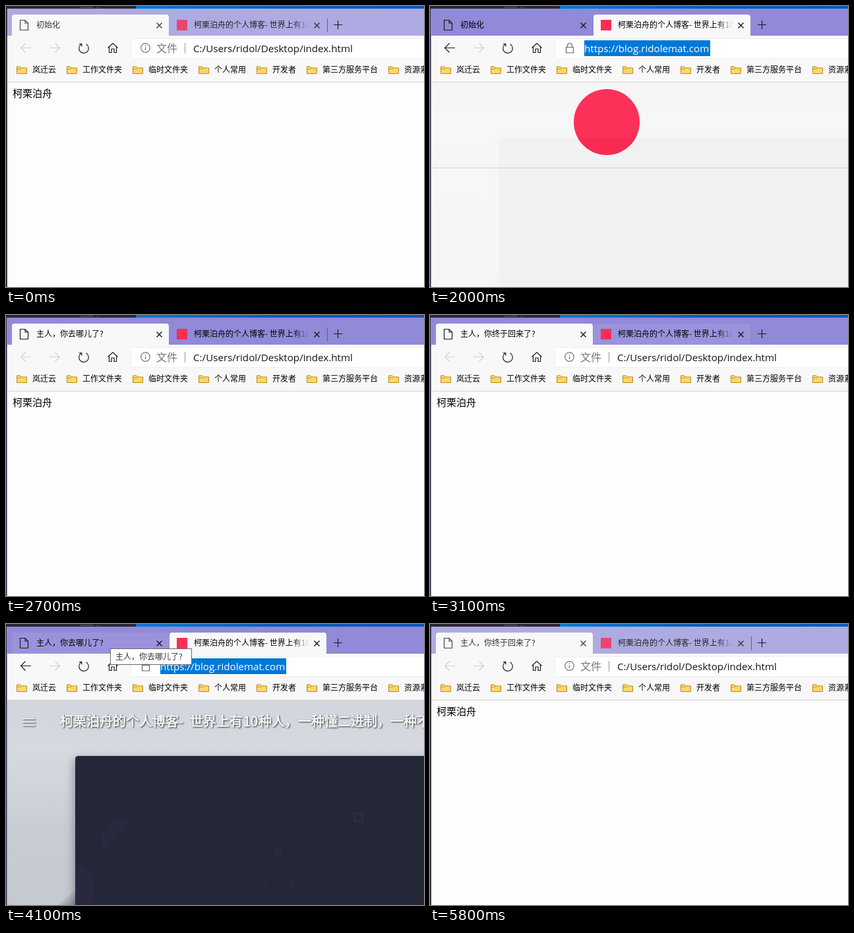
Write an HTML page that moves like this. It is 634x426 px and loops after 5.9 s.

```html
<!DOCTYPE html>
<html lang="zh-CN">
<head>
<meta charset="utf-8">
<title>标签页标题</title>
<style>
html, body { margin: 0; width: 100%; height: 100%; overflow: hidden; background: #fdfdfd; }
svg { display: block; width: 634px; height: 426px; font: 12px "Noto Sans CJK SC", "Noto Sans", sans-serif; }
.line { fill: none; stroke: #1c1c1c; stroke-width: 1.2; }
.off { stroke: #cfcfcf; }
.address { font: 15.15px "Open Sans", "Noto Sans", sans-serif; }
.headline { font-size: 20px; fill: #fff; stroke: #fff; stroke-width: .5; }
.raised { filter: drop-shadow(1px 1px 1px rgba(0, 0, 0, .8)); }
.decor { fill: none; stroke: #2d2b42; }
.decor .solid { fill: #29283f; stroke: none; }
</style>
</head>
<body>
<svg viewBox="0 0 634 426">
  <defs>
    <linearGradient id="desk"><stop stop-color="#0878d8"/><stop offset=".5" stop-color="#0a5cb8"/><stop offset="1" stop-color="#0a58c0"/></linearGradient>
    <linearGradient id="fade" gradientUnits="userSpaceOnUse" x1="434" x2="460"><stop/><stop offset="1" stop-opacity="0"/></linearGradient>
    <linearGradient id="sky" x2="0" y2="1"><stop stop-color="#d2d5dd"/><stop offset=".25" stop-color="#d6d9e0"/><stop offset=".65" stop-color="#c8cdd4"/><stop offset="1" stop-color="#c4c9d0"/></linearGradient>
    <linearGradient id="rock" x1="0" y1="0" x2="1" y2="1"><stop offset=".35" stop-color="#9a9da4" stop-opacity="0"/><stop offset="1" stop-color="#858890"/></linearGradient>
    <filter id="soft" x="-10%" y="-10%" width="120%" height="130%"><feGaussianBlur stdDeviation="7"/></filter>
    <clipPath id="panelClip"><path d="M634 200H110q-5 0-5 5v221h529z"/></clipPath>
    <g id="folder">
      <path d="M.5 11.500V.9h5.200l1.600 2h8.200v8.600z" fill="#ffd766" stroke="#b88a1c"/>
      <path d="M1 4.500h5.500l1.200-1.400" fill="none" stroke="#c89a2c"/>
    </g>
    <path id="cross" class="line" d="M-4-4 4 4M4-4-4 4" style="stroke-width:1.500"/>
  </defs>

  <rect width="634" height="426" fill="#2a2631"/>
  <path fill="url(#desk)" d="M197 0h437v5H197z"/>
  <path fill="#48444e" d="M112 1h20v2h-20zM136 2h8v1h-8z"/>
  <rect id="edge" x="1" y="4" width="1" height="422"/>
  <rect id="bar" x="2" y="4" width="632" height="41"/>

  <path id="tab1" d="M9 45V17q0-4 4-4h230q4 0 4 4v28z"/>
  <path id="tab2" d="M248 45V17q0-4 4-4h230q4 0 4 4v28z"/>
  <g id="labels">
    <path class="line" d="M21.500 21.500h7.500l4.500 4.500v10.500h-12zM29 21.500v4.500h4.500"/>
    <text id="name" x="46" y="33"></text>
    <use href="#cross" x="232.500" y="29.500"/>
    <rect x="259" y="21" width="16" height="16" fill="#fb2d55"/>
    <text x="285" y="33" fill="url(#fade)">柯栗泊舟的个人博客- 世界上有10</text>
    <use href="#cross" x="471.500" y="29.500"/>
  </g>
  <path id="divider" d="M487.500 19v21" stroke="#615d91"/>
  <path class="line" d="M497 28.500h13M503.500 22v13"/>

  <rect x="2" y="45" width="632" height="71" fill="#f8f8f8"/>
  <rect id="hover" x="98" y="49" width="40" height="30" rx="2" fill="#e4e4e4"/>
  <path id="back" class="line" d="M38 63.500H22.500M29.500 56.500l-7 7 7 7"/>
  <path class="line off" d="M66 63.500h15.500M74.500 56.500l7 7-7 7"/>
  <path class="line" d="M121.500 57.700a7.300 7.300 0 1 1-7.500.300M110.800 57.500h4v4"/>
  <path class="line" d="M154.500 63.500l7.500-7 7.500 7M156.500 62v8.500h3.500v-5.500h4v5.500h3.500V62"/>
  <rect x="189.500" y="49.500" width="450" height="30" rx="2" fill="#fff" stroke="#efefef"/>
  <g id="fileAddress">
    <circle cx="211.500" cy="63.500" r="6.800" class="line" style="stroke:#767676"/>
    <path d="M211.500 62.500v4.500M211.500 59.500v1.500" stroke="#767676" stroke-width="1.300"/>
    <text x="228" y="70" font-size="16" fill="#767676">文件</text>
    <path d="M271.500 56v16" stroke="#9a9a9a"/>
    <text class="address" x="284" y="70" fill="#161616">C:/Users/ridol/Desktop/index.html</text>
  </g>
  <g id="webAddress">
    <path class="line" style="stroke:#666" d="M206.500 62.500h11v8.500h-11zM208.500 62.500v-2.500a3.500 3.500 0 0 1 7 0v2.500"/>
    <rect x="234" y="52" width="191" height="24" fill="#0078d7"/>
    <text class="address" x="234" y="70" fill="#fff">https://blog.ridolemat.com</text>
  </g>
  <g id="bookmarks"></g>
  <path d="M2 115.500h632" stroke="#d4d4d4"/>

  <g id="filePage">
    <rect x="2" y="116" width="632" height="310" fill="#fdfdfd"/>
    <text x="10" y="138" font-size="15">柯栗泊舟</text>
  </g>

  <g id="blog">
    <rect x="2" y="116" width="632" height="310" fill="url(#sky)"/>
    <path d="M78 426l27-22v22z" fill="url(#rock)"/>
    <rect x="103" y="205" width="560" height="250" fill="#454954" opacity=".5" filter="url(#soft)"/>
    <g clip-path="url(#panelClip)">
      <rect x="105" y="200" width="529" height="226" fill="#232738"/>
      <g class="decor">
        <circle class="solid" cx="93" cy="401" r="41"/>
        <path class="solid" d="M150 344A29 29 0 0 1 190 303z"/>
        <path id="waves"/>
        <path d="M528.500 287.500h12v11h-12z" stroke-width="3"/>
        <rect class="solid" x="406" y="340" width="13" height="13" rx="3"/>
        <circle class="solid" cx="393" cy="393" r="4.500"/>
        <circle class="solid" cx="433" cy="393" r="4"/>
        <path d="M168 342l47-63 75 121M258 400l22-80 50 82" stroke="#27283b"/>
        <path d="M151 413h38M151 424h38" stroke-width="2" stroke-dasharray="2 15"/>
      </g>
    </g>
    <g class="raised">
      <path d="M25 143.500h19M25 148.500h19M25 153.500h19" stroke="#fff" stroke-width="1.500"/>
      <text class="headline" y="155"><tspan x="82">柯栗泊舟的个人博客-</tspan><tspan x="279">世界上有</tspan><tspan x="360">10</tspan><tspan x="383">种人，一种懂二进制，一种不懂</tspan></text>
    </g>
  </g>

  <g id="loader">
    <rect x="2" y="116" width="632" height="310" fill="#f8f8f8"/>
    <path d="M2 245.500h632" stroke="#d6d6d6"/>
    <circle cx="268" cy="176" r="50" fill="#fe2c55"/>
  </g>

  <g id="tip">
    <rect x="158.500" y="37.500" width="123" height="24" fill="#fff" stroke="#686868"/>
    <text x="166" y="54" fill="#333">主人，你去哪儿了?</text>
  </g>
</svg>

<script>
const LOOP = 5900;
const $ = id => document.getElementById(id);
const AWAY = '主人，你去哪儿了?';
const BACK = '主人，你终于回来了?';

// Each step changes only the listed properties and holds until the next.
const steps = [
  [0, { tab: 1, focus: false, name: '初始化', divider: true, hover: false, veil: 0, over: 0, tip: false }],
  [500, { focus: true, hover: true }],
  [1000, { hover: false }],
  [1200, { divider: false, over: 2 }],
  [1900, { tab: 2, veil: 1, over: 0 }],
  [2000, { veil: .97 }],
  [2100, { veil: .5 }],
  [2200, { veil: 0, over: 1 }],
  [2400, { name: AWAY }],
  [2700, { tab: 1, divider: true, over: 0 }],
  [2900, { name: BACK }],
  [3100, { divider: false, over: 2 }],
  [3500, { tab: 2, over: 0 }],
  [3700, { name: AWAY }],
  [4100, { over: 1, tip: true }],
  [4200, { tab: 1, divider: true, over: 0, tip: false }],
  [4400, { name: BACK }],
  [5800, { focus: false }]
];

const folders = [[16, '岚迁云'], [92, '工作文件夹'], [192, '临时文件夹'], [292, '个人常用'],
  [380, '开发者'], [456, '第三方服务平台'], [580, '资源素材']];
$('bookmarks').innerHTML = folders.map(([x, label]) =>
  `<use href="#folder" x="${x}" y="91"/><text x="${x + 24}" y="101">${label}</text>`).join('');

const wave = y => `M336 ${y}q3-5 6 0` + 't6 0'.repeat(9);
$('waves').setAttribute('d', wave(257) + wave(267));

const show = (id, on) => $(id).style.display = on ? '' : 'none';
const paint = (id, color) => $(id).setAttribute('fill', color);

function draw(s) {
  const bar = s.focus ? '#908ad8' : '#aeabe2';
  const tabColor = n => s.tab === n ? '#f8f8f8' : s.over === n ? '#9a93dc' : bar;
  const blog = s.tab === 2;
  paint('bar', bar);
  paint('edge', s.focus ? bar : '#4a4654');
  paint('tab1', tabColor(1));
  paint('tab2', tabColor(2));
  $('labels').style.opacity = s.focus ? 1 : .8;
  $('name').textContent = s.name;
  $('back').classList.toggle('off', !blog);
  show('divider', s.divider && !blog);
  show('hover', s.hover);
  show('fileAddress', !blog);
  show('filePage', !blog);
  show('webAddress', blog);
  show('blog', blog);
  show('loader', s.veil > 0);
  $('loader').style.opacity = s.veil;
  show('tip', s.tip);
}

let last = -1;
const start = performance.now();
function tick() {
  const t = (performance.now() - start) % LOOP;
  const count = steps.filter(([at]) => at <= t).length;
  if (count !== last) {
    last = count;
    draw(Object.assign({}, ...steps.slice(0, count).map(([, change]) => change)));
  }
  requestAnimationFrame(tick);
}
tick();
</script>
</body>
</html>
```
